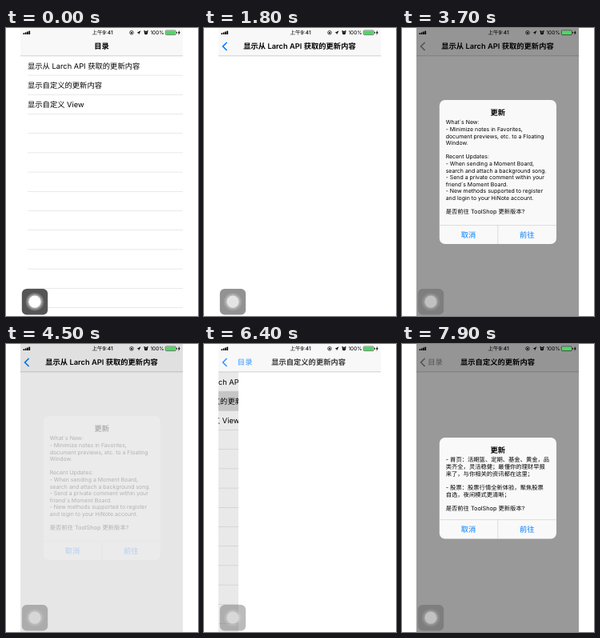
These frames come from a looping animation (240 by 360 pixels, 8000 ms). An HTML page with a canvas:

```html
<!DOCTYPE html>
<html lang="zh-CN">
<head>
<meta charset="utf-8">
<style>
html, body { margin: 0; width: 100%; height: 100%; overflow: hidden; background: #fff; }
canvas { display: block; width: 240px; height: 360px; }
</style>
</head>
<body>
<canvas id="stage"></canvas>
<script>
const LOOP = 8000, W = 240, H = 360;
const LEFT = 18, WIDTH = 203, MID = 119.5, NAV = 35, ROW = 24.2;
const FONT = 'Inter, "Noto Sans CJK SC", "Noto Sans CJK", sans-serif';
const BLUE = '#007aff';
const canvas = document.getElementById('stage');
const c = canvas.getContext('2d');
const dpr = window.devicePixelRatio || 1;
canvas.width = W * dpr;
canvas.height = H * dpr;

const rows = ['显示从 Larch API 获取的更新内容', '显示自定义的更新内容', '显示自定义 View'];
const alerts = [
  { top: 90, bottom: 270, line: 246.5, text: [
    'What´s New:', '- Minimize notes in Favorites,', 'document previews, etc. to a Floating', 'Window.', '',
    'Recent Updates:', '- When sending a Moment Board,', 'search and attach a background song.',
    '- Send a private comment within your', 'friend´s Moment Board.',
    '- New methods supported to register', 'and login to your HiNote account.', '',
    '是否前往 ToolShop 更新版本?'] },
  { top: 117, bottom: 243.5, line: 219.5, text: [
    '- 首页：活期篮、定期、基金、黄金，品', '类齐全，灵活稳健；最懂你的理财早报', '来了，与你相关的资讯都在这里；', '',
    '- 股票：股票行情全新体验，聚焦股票', '自选，夜间模式更清晰；', '',
    '是否前往 ToolShop 更新版本?'] }
];

const ramp = (t, start, len) => Math.min(1, Math.max(0, (t - start) / len));
const easeOut = p => 1 - (1 - p) ** 3;

function rect(x, y, w, h, color) {
  c.fillStyle = color;
  c.fillRect(x, y, w, h);
}
function roundRect(x, y, w, h, r, color) {
  c.fillStyle = color;
  c.beginPath();
  c.roundRect(x, y, w, h, r);
  c.fill();
}
function circle(x, y, r, color) {
  c.fillStyle = color;
  c.beginPath();
  c.arc(x, y, r, 0, 7);
  c.fill();
}
function poly(points, color) {
  c.fillStyle = color;
  c.beginPath();
  points.forEach(p => c.lineTo(p[0], p[1]));
  c.fill();
}
// y is the optical centre of the line
function text(s, x, y, size, { align = 'left', weight = 400, color = '#000' } = {}) {
  c.font = `${weight} ${size}px ${FONT}`;
  c.textAlign = align;
  c.fillStyle = color;
  c.fillText(s, x, y + size * 0.37);
}
function layer(alpha, draw) {
  if (alpha <= 0) return;
  c.save();
  c.globalAlpha *= alpha;
  draw();
  c.restore();
}

function drawStatus() {
  for (let i = 0; i < 4; i++) rect(21.5 + i * 2.3, 6.3 - i * 0.9, 1.7, 1.7 + i * 0.9, '#000');
  text('上午9:41', 120.5, 5.6, 6.6, { align: 'center', weight: 500 });
  c.strokeStyle = '#000';
  c.lineWidth = 0.7;
  c.beginPath();
  c.arc(157, 5.8, 2.3, 0, 7);
  c.stroke();
  rect(156, 5.2, 2, 1.5, '#000');
  poly([[163.5, 6], [168.5, 3.3], [166, 8.3], [165.6, 6.3]], '#000');
  circle(175, 6, 2.2, '#000');
  circle(173.1, 3.9, 0.8, '#000');
  circle(176.9, 3.9, 0.8, '#000');
  rect(174.7, 4.7, 0.6, 1.6, '#fff');
  text('100%', 180.5, 5.7, 6.4);
  c.lineWidth = 0.5;
  c.beginPath();
  c.roundRect(199.3, 3, 13, 5.6, 1.3);
  c.stroke();
  roundRect(199.9, 3.6, 11.8, 4.4, 0.7, '#4cd964');
  rect(212.9, 4.9, 0.9, 1.8, '#000');
  poly([[217, 2.8], [214.7, 6.3], [216, 6.3], [215.5, 8.9], [217.8, 5.2], [216.5, 5.2]], '#000');
}

function drawList(x, picked, glow) {
  rect(x, NAV, WIDTH, H - NAV, '#fff');
  layer(glow, () => rect(x, NAV, WIDTH, ROW, '#d9d9d9'));
  for (let i = 1; i <= 13; i++) rect(x + 9, NAV + i * ROW - 0.4, WIDTH - 9, 0.6, '#dadadc');
  if (picked >= 0) rect(x, NAV + picked * ROW, WIDTH, ROW, '#d9d9d9');
  rows.forEach((s, i) => text(s, x + 9, NAV + (i + 0.5) * ROW, 9.3));
}

function drawNav(push, page, tint) {
  rect(LEFT, 0, WIDTH, NAV, '#f8f8f8');
  rect(LEFT, NAV - 0.4, WIDTH, 0.6, '#b2b2b2');
  // the list title slides over to become the back label
  const backX = MID - push * 78;
  layer((1 - push) ** 2, () =>
    text('目录', backX, 23, 9.3, { align: 'center', weight: 600 }));
  layer(push ** 2, () => {
    text(rows[page], MID + (1 - push) * 90, 23, 9.3, { align: 'center', weight: 600 });
    c.strokeStyle = tint;
    c.lineWidth = 1.6;
    c.beginPath();
    c.moveTo(28.6, 18);
    c.lineTo(23.6, 23);
    c.lineTo(28.6, 28);
    c.stroke();
    if (page === 1) text('目录', backX, 23, 9.3, { align: 'center', color: tint });
  });
}

function drawAlert({ top, bottom, line, text: lines }, scale) {
  c.translate(120, 180);
  c.scale(scale, scale);
  c.translate(-120, -180);
  roundRect(46.8, top, 146.2, bottom - top, 7, '#f9f9f9');
  text('更新', 119.7, top + 15.8, 9.3, { align: 'center', weight: 600 });
  lines.forEach((s, i) => {
    const size = /[\u4e00-\u9fff]/.test(s) ? 7.3 : 6.95;
    text(s, 54.7, top + 27.7 + i * 8.62, size);
  });
  rect(46.8, line, 146.2, 0.6, '#c8c8cc');
  rect(119.6, line, 0.6, bottom - line, '#c8c8cc');
  text('取消', 83, line + 12, 9.3, { align: 'center', color: BLUE });
  text('前往', 156.3, line + 12, 9.3, { align: 'center', color: BLUE });
}

function drawTouch(alpha) {
  layer(alpha, () => {
    roundRect(19.8, 326, 32.4, 32.4, 6, '#555');
    circle(36, 342.2, 11.3, 'rgba(255,255,255,0.2)');
    circle(36, 342.2, 9.4, 'rgba(255,255,255,0.35)');
    circle(36, 342.2, 7.6, '#fff');
  });
}

function draw(t) {
  const page = t < 5900 ? 0 : 1;
  const push = page === 0
    ? easeOut(ramp(t, 1300, 500)) - easeOut(ramp(t, 5250, 500))
    : easeOut(ramp(t, 6150, 500));
  const picked = t >= 1100 && t < 5250 ? 0 : t >= 6000 ? 1 : -1;
  const glow = t >= 5250 ? 1 - ramp(t, 5250, 600) : 0;
  const shown = page === 0 ? ramp(t, 2000, 320) : ramp(t, 6800, 320);
  const closed = page === 0 ? ramp(t, 4300, 400) : 0;
  const alpha = (1 - (1 - shown) ** 4) * (1 - closed) ** 2;
  const tint = shown > 0 && closed === 0 ? '#8a8a8a' : BLUE;

  c.setTransform(dpr, 0, 0, dpr, 0, 0);
  c.textRendering = 'geometricPrecision';
  rect(0, 0, W, H, '#fff');
  c.save();
  c.beginPath();
  c.rect(LEFT, 0, WIDTH, H);
  c.clip();
  if (push < 1) drawList(LEFT - push * WIDTH * 0.3, picked, glow);
  if (push > 0) {
    rect(LEFT, NAV, WIDTH, H - NAV, `rgba(0,0,0,${0.1 * push})`);
    rect(LEFT + (1 - push) * WIDTH, NAV, WIDTH, H - NAV, '#fff');
  }
  drawNav(push, page, tint);
  rect(LEFT, 0, WIDTH, H, `rgba(0,0,0,${0.4 * alpha})`);
  drawStatus();
  layer(alpha, () => drawAlert(alerts[page], 1 + 0.2 * (1 - easeOut(shown))));
  drawTouch(1 - 0.6 * ramp(t, 1500, 500));
  c.restore();
}

const begin = performance.now();
function tick() {
  draw((performance.now() - begin) % LOOP);
  requestAnimationFrame(tick);
}
tick();
</script>
</body>
</html>
```
